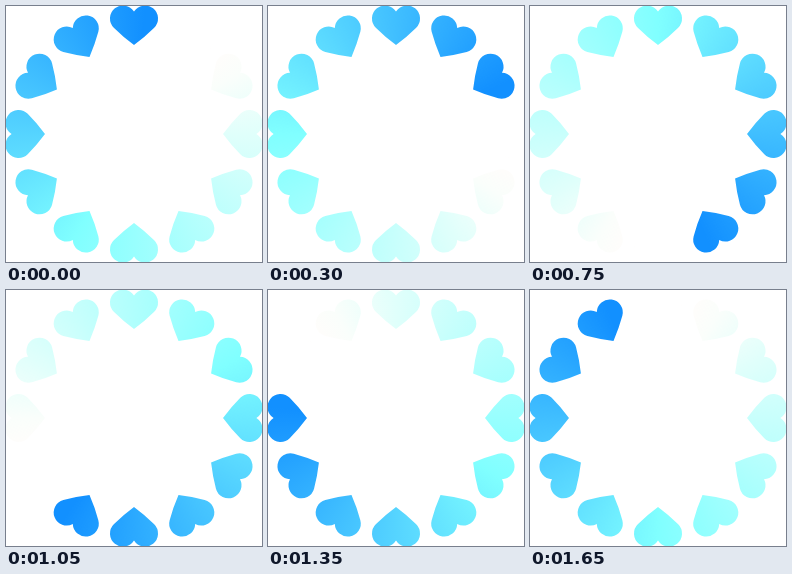
An HTML page for the animation above (1800 ms loop, 256 px wide and 256 px high).

```html
<!DOCTYPE html>
<html lang="en">
<head>
<meta charset="utf-8">
<title>Heart spinner</title>
<style>
  html, body { margin: 0; width: 100%; height: 100%; overflow: hidden; background: #fff; }
  .ring { position: relative; width: 256px; height: 256px; overflow: hidden; clip-path: url(#hearts); }
  .sweep {
    position: absolute;
    inset: -56px;
    background: conic-gradient(from 15deg,
      #fff 0deg 26deg, #fefdfb 34deg, #fafefb 45deg, #e0fffb 75deg,
      #80ffff 195deg, #1290ff 350deg);
  }
  svg { position: absolute; width: 0; height: 0; }
</style>
</head>
<body>
<svg aria-hidden="true"><clipPath id="hearts" clipPathUnits="userSpaceOnUse"></clipPath></svg>
<div class="ring"><div class="sweep"></div></div>
<script>
  const COUNT = 12;
  const LOOP = 1800;
  const HEART = 'M128 39Q117 30.9 107.8 21.7A13 13 0 1 1 128 5.6A13 13 0 1 1 148.2 21.7Q139 30.9 128 39Z';

  const clip = document.getElementById('hearts');
  for (let i = 0; i < COUNT; i++) {
    const heart = document.createElementNS('http://www.w3.org/2000/svg', 'path');
    heart.setAttribute('d', HEART);
    heart.setAttribute('transform', `rotate(${i * 360 / COUNT} 128 128)`);
    clip.append(heart);
  }

  // The hearts stay put; the colour sweep jumps one heart per step.
  document.querySelector('.sweep').animate(
    { transform: ['rotate(0deg)', 'rotate(360deg)'] },
    { duration: LOOP, iterations: Infinity, easing: `steps(${COUNT}, end)` }
  );
</script>
</body>
</html>
```
